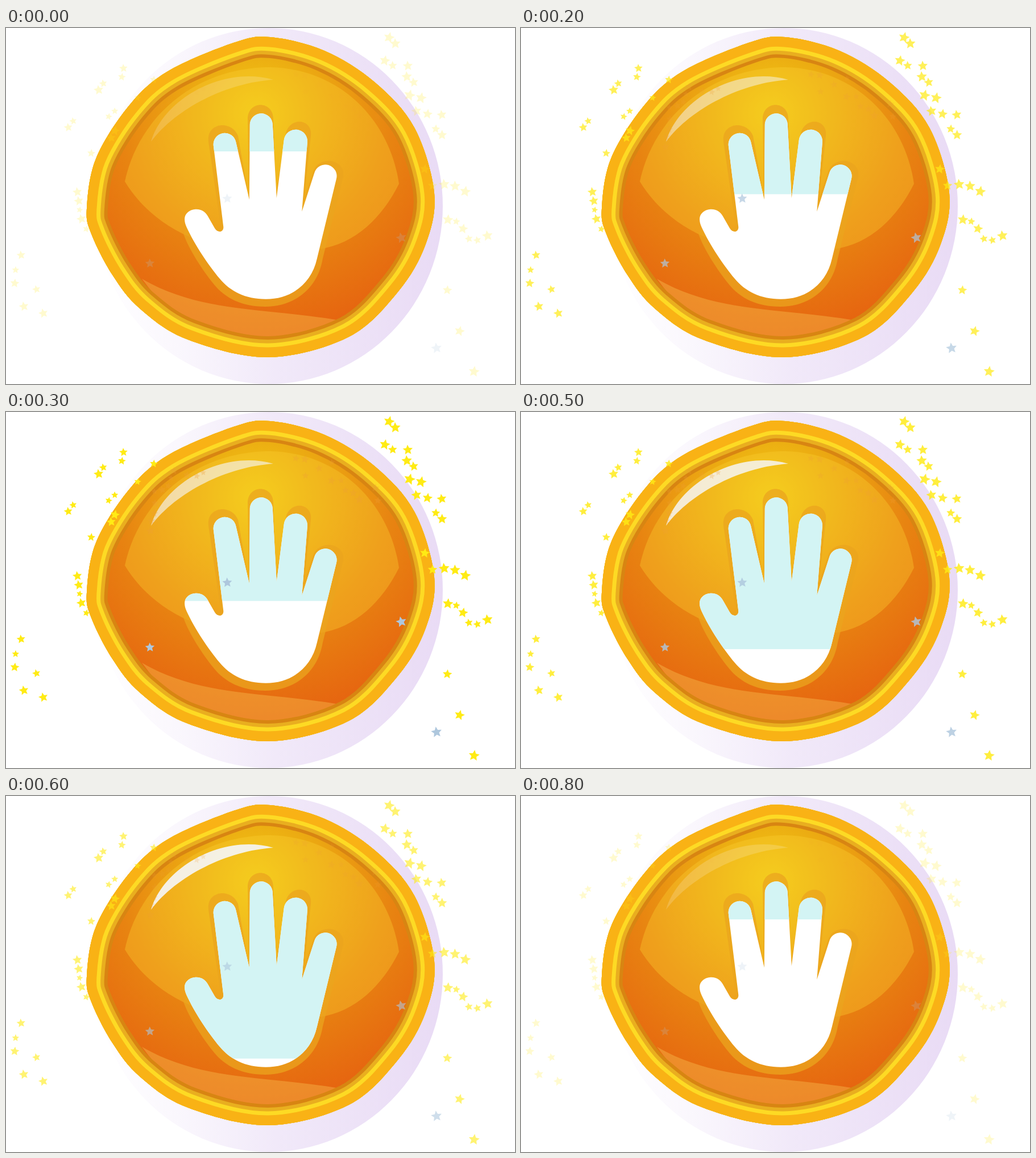
An HTML page for the animation above (900 ms loop, 895x626 px).

```html
<!DOCTYPE html>
<html lang="en">
<head>
<meta charset="utf-8">
<title>Hand button</title>
<style>
  html, body { margin: 0; width: 100%; height: 100%; overflow: hidden; background: #fff; }
  svg { display: block; width: 100%; height: 100%; }
</style>
</head>
<body>
<svg viewBox="0 0 895 626">
  <defs>
    <linearGradient id="lavender">
      <stop offset="0" stop-color="#fff"/>
      <stop offset=".24" stop-color="#faf7fd"/>
      <stop offset=".52" stop-color="#f1e9f9"/>
      <stop offset="1" stop-color="#e9dbf5"/>
    </linearGradient>
    <radialGradient id="amber" gradientUnits="userSpaceOnUse" cx="440" cy="150" r="400">
      <stop offset="0" stop-color="#f2cc14"/>
      <stop offset=".25" stop-color="#ecae12"/>
      <stop offset=".6" stop-color="#e88411"/>
      <stop offset="1" stop-color="#e66310"/>
    </radialGradient>
    <clipPath id="discClip"><path class="disc"/></clipPath>
    <clipPath id="levelClip"><rect id="level" width="895"/></clipPath>
    <path id="hand" transform="translate(.8 .8)" d="M364 206A20 20 0 0 1 403.5 200L427 301L428 170
      A20 20 0 0 1 468 169L475 298L488 196A20.5 20.5 0 0 1 529 201L519.5 322L541.5 254
      A20 20 0 0 1 580 265L546 405C536 450 500 476 456 476C420 476 393 462 375 440
      C355 416 332 382 317 350C306 327 322 318 334 318C344 318 350 323 354 330L366 351
      C371 360 382 359 381.5 349Z"/>
  </defs>

  <ellipse cx="462" cy="313" rx="306" ry="313" fill="url(#lavender)"/>
  <g clip-path="url(#discClip)" fill="none">
    <path class="disc" fill="url(#amber)"/>
    <path fill="#f8cc30" fill-opacity=".36" d="M209 270C232 160 330 69 465 69C590 72 676 165 691 274
      C662 332 615 380 550 389C400 414 270 370 209 270Z"/>
    <path fill="#f8c050" fill-opacity=".4" d="M239 441C340 500 450 492 580 513L560 560H330Z"/>
    <path class="disc" stroke="#d88512" stroke-width="74"/>
    <path class="disc" stroke="#e9ae1f" stroke-width="62"/>
    <path class="disc" stroke="#fdda24" stroke-width="49"/>
    <path class="disc" stroke="#f9b215" stroke-width="35"/>
  </g>
  <path id="gloss" fill="#f6f6f6" d="M255 200C278 122 385 66 470 91C390 96 300 140 255 200Z"/>
  <path fill="#eba41e" fill-opacity=".75" d="M356 200C352 165 398 162 408 190L427 297L425 160
    C425 127 470 127 470 160L475 290L492 185C500 155 540 160 536 190L524 300L541 250
    C552 224 598 230 593 262L557 405C548 460 505 490 456 490C415 490 385 475 365 450
    C345 425 322 390 312 362L320 345L378 352Z"/>
  <use href="#hand" fill="#fff"/>
  <use href="#hand" fill="#d3f4f4" clip-path="url(#levelClip)"/>
  <g id="stars"></g>
</svg>
<script>
const byId = id => document.getElementById(id);

// Closed Catmull-Rom curve through a few points.
function smooth(points) {
  const n = points.length, at = i => points[(i + n) % n];
  const curves = points.map((b, i) => {
    const [a, c, e] = [at(i - 1), at(i + 1), at(i + 2)];
    const out = b.map((v, k) => v + (c[k] - a[k]) / 6);
    const into = c.map((v, k) => v - (e[k] - b[k]) / 6);
    return `C${out} ${into} ${c}`;
  });
  return `M${points[0]}${curves.join('')}Z`;
}

const outline = smooth([
  [465, 16], [560, 40], [648, 95], [718, 175], [753, 290], [738, 380], [690, 463], [603, 543], [462, 579],
  [320, 548], [236, 494], [187, 434], [150, 362], [142, 317], [158, 230], [215, 138], [283, 77], [400, 26]
]);
document.querySelectorAll('.disc').forEach(path => path.setAttribute('d', outline));

let seed = 7;
const random = () => (seed = seed * 16807 % 2147483647) / 2147483647;
const spread = size => (random() - 0.5) * size;

function addStar(x, y, radius, color, opacity = 1) {
  const tilt = spread(0.5);
  const points = Array.from({ length: 10 }, (_, i) => {
    const r = i % 2 ? radius * 0.47 : radius, a = tilt + i * Math.PI / 5;
    return [x + r * Math.sin(a), y - r * Math.cos(a)];
  });
  byId('stars').insertAdjacentHTML('beforeend',
    `<polygon points="${points.join(' ')}" fill="${color}" fill-opacity="${opacity}"/>`);
}

// Scatters stars evenly along a line, loosely to both sides of it.
function addTrail(count, [x1, y1], [x2, y2], width, radius, color, opacity) {
  const length = Math.hypot(x2 - x1, y2 - y1);
  for (let i = 0; i < count; i++) {
    const t = (i + 0.5) / count, side = spread(width) / length;
    addStar(x1 + (x2 - x1) * t + (y2 - y1) * side, y1 + (y2 - y1) * t - (x2 - x1) * side,
      radius + spread(3), color, opacity);
  }
}

const yellow = '#ffeb14', blue = '#aec7dd', tan = '#eda035';
addTrail(12, [230, 190], [345, 95], 60, 6.5, tan, 0.3);
addTrail(12, [505, 75], [660, 160], 50, 7, tan, 0.3);
addTrail(13, [235, 65], [130, 215], 80, 7.5, yellow);
addTrail(5, [140, 285], [120, 355], 50, 7.5, yellow);
addTrail(6, [20, 390], [60, 515], 50, 7.5, yellow);
addTrail(14, [655, 20], [770, 195], 45, 9, yellow);
addTrail(5, [725, 255], [820, 275], 35, 9.3, yellow);
addTrail(6, [767, 345], [853, 370], 25, 8.5, yellow);
addTrail(3, [790, 420], [835, 640], 60, 9.5, yellow);
[[389, 300], [253, 414], [695, 369], [757, 563]].forEach(([x, y]) => addStar(x, y, 8 + x / 400, blue));

function draw() {
  // Eight poses of 100 ms; the first also closes the loop.
  const step = Math.floor(performance.now() % 900 / 100) % 8;
  const starOpacity = step < 3 ? 0.2 + 0.25 * step : 1 - 0.045 * (step - 3) ** 2;
  byId('level').setAttribute('height', 217 + 36 * step + 0.8 * step ** 2);
  byId('stars').setAttribute('opacity', starOpacity);
  byId('gloss').setAttribute('opacity', 0.95 - 0.77 * (1 - step / 7) ** 1.6);
  requestAnimationFrame(draw);
}
draw();
</script>
</body>
</html>
```
